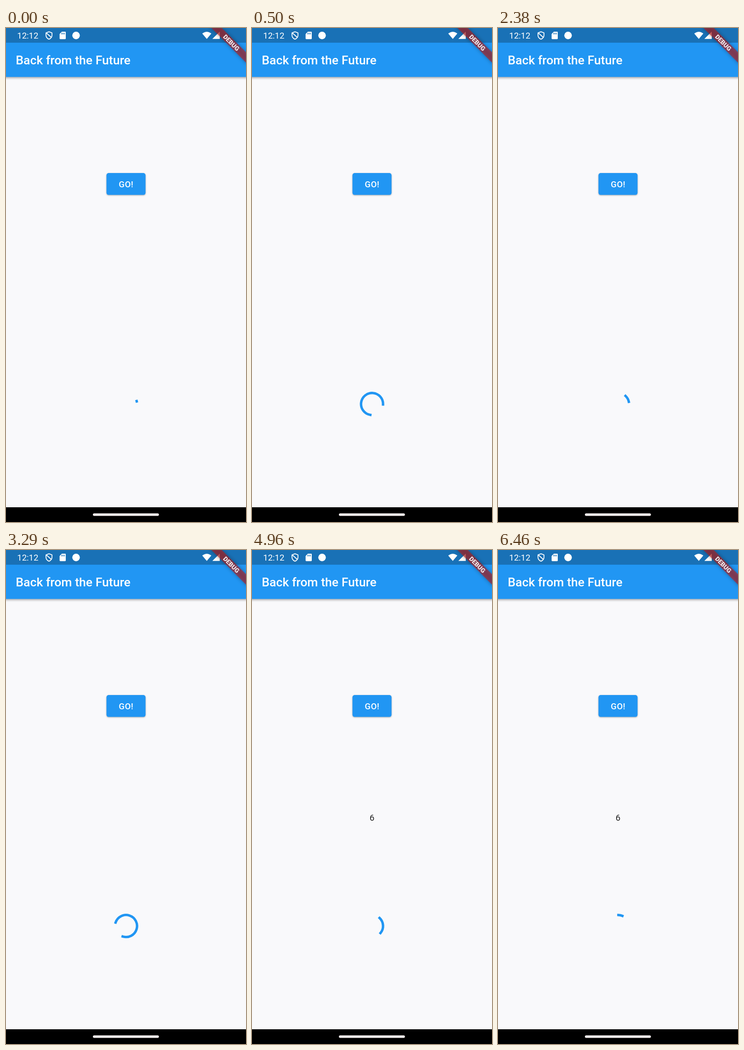
These frames come from a looping animation (522x1073 px, 6500 ms). An HTML page:

```html
<!DOCTYPE html>
<html lang="en">
<head>
<meta charset="utf-8">
<title>Back from the Future</title>
<style>
  html, body { margin: 0; width: 100%; height: 100%; overflow: hidden; background: #f9f9fb; }
  svg { display: block; width: 522px; height: 1073px; }
  text { font-family: Roboto, sans-serif; font-size: 18.6px; fill: #fff; }
  .mid { text-anchor: middle; }
  .medium { font-weight: 500; }
  .bar { filter: drop-shadow(0 2.2px 2.6px rgba(0, 0, 0, .36)); }
  .button { filter: drop-shadow(0 1.8px 1.6px rgba(0, 0, 0, .32)); }
  .ribbon { filter: drop-shadow(0 0 4px rgba(0, 0, 0, .5)); }
</style>
</head>
<body>
<svg viewBox="0 0 522 1073">
  <rect width="522" height="1073" fill="#f9f9fb"/>

  <!-- App bar and status bar -->
  <rect class="bar" x="-20" y="-20" width="562" height="126.3" fill="#2196f3"/>
  <rect width="522" height="31.9" fill="#1971b6"/>
  <text x="21.3" y="79.3" class="medium" style="font-size:26.6px">Back from the Future</text>
  <text x="24.2" y="23">12:12</text>
  <path d="M93.5 8.2 L100 10.6 V15.6 C100 20 97.2 23 93.5 24.4 C89.8 23 87 20 87 15.6 V10.6 Z M88 11 L98.6 20.5"
        fill="none" stroke="#fff" stroke-width="1.8" stroke-linejoin="round"/>
  <path d="M121.5 8 H128.6 Q130 8 130 9.4 V22.8 Q130 24.2 128.6 24.2 H118 Q116.6 24.2 116.6 22.8 V13 Z" fill="#fff"/>
  <path d="M121.3 10.5 V13.8 M124.2 10.5 V13.8 M127.1 10.5 V13.8" stroke="#1971b6" stroke-width="1.5"/>
  <circle cx="152.4" cy="16.2" r="8.2" fill="#fff"/>
  <path d="M426.8 12 Q436.7 4.4 446.6 12 L436.7 23.8 Z M465 7.8 V23.8 H448.8 Z" fill="#fff"/>

  <!-- Content -->
  <rect class="button" x="218.5" y="315" width="85" height="47.6" rx="5" fill="#2196f3"/>
  <text x="261.2" y="345.6" class="mid medium" letter-spacing=".4">GO!</text>
  <text id="result" x="261" y="588.2" class="mid" style="fill:#212121"></text>
  <path id="spinner" fill="none" stroke="#2196f3" stroke-width="5.32" stroke-linecap="square"/>

  <!-- Navigation bar -->
  <rect y="1041" width="522" height="32" fill="#000"/>
  <rect x="189" y="1054.2" width="143.6" height="5.6" rx="2.8" fill="#f3eded"/>

  <!-- Corner ribbon -->
  <g transform="translate(522 0) rotate(45)">
    <rect class="ribbon" x="-60" y="37.2" width="120" height="16" fill="#b71c1c" fill-opacity=".627"/>
    <text class="mid" x="0" y="50" style="font-size:13.6px;font-weight:900;fill-opacity:.9">DEBUG</text>
  </g>
</svg>
<script>
  const LOOP = 6500, STEP = 1000 / 24;
  const SWEEP_PERIOD = 1344, TURN_PERIOD = 2222;
  const RESULT_AT = 3300;
  const CX = 261.1, CY = 816.7, R = 23.93;
  const spinner = document.getElementById('spinner');
  const result = document.getElementById('result');

  // cubic-bezier(.4, 0, .2, 1) over the span from..from + .5
  function ease(phase, from) {
    const x = Math.min(1, Math.max(0, (phase - from) * 2));
    let lo = 0, hi = 1;
    for (let i = 0; i < 24; i++) {
      const s = (lo + hi) / 2, q = 1 - s;
      if (1.2 * q * q * s + 0.6 * q * s * s + s * s * s < x) lo = s; else hi = s;
    }
    return lo * lo * (3 - 2 * lo);
  }

  function point(deg) {
    const a = deg * Math.PI / 180;
    return (CX + R * Math.cos(a)).toFixed(3) + ' ' + (CY + R * Math.sin(a)).toFixed(3);
  }

  function draw(t) {
    const phase = (0.028 + t / SWEEP_PERIOD) % 1;
    const head = ease(phase, 0), tail = ease(phase, 0.5);
    const start = -18 + 360 * t / TURN_PERIOD + 90 * phase + 270 * tail;
    const sweep = Math.max(0.5, 270 * (head - tail));
    spinner.setAttribute('d',
      `M${point(start)} A${R} ${R} 0 ${sweep > 180 ? 1 : 0} 1 ${point(start + sweep)}`);
    result.textContent = t >= RESULT_AT ? '6' : '';
  }

  const begin = performance.now();
  function tick(now) {
    const t = Math.max(0, now - begin) % LOOP;
    draw(Math.floor((t + 5) / STEP) * STEP % LOOP);
    requestAnimationFrame(tick);
  }
  draw(0);
  requestAnimationFrame(tick);
</script>
</body>
</html>
```
